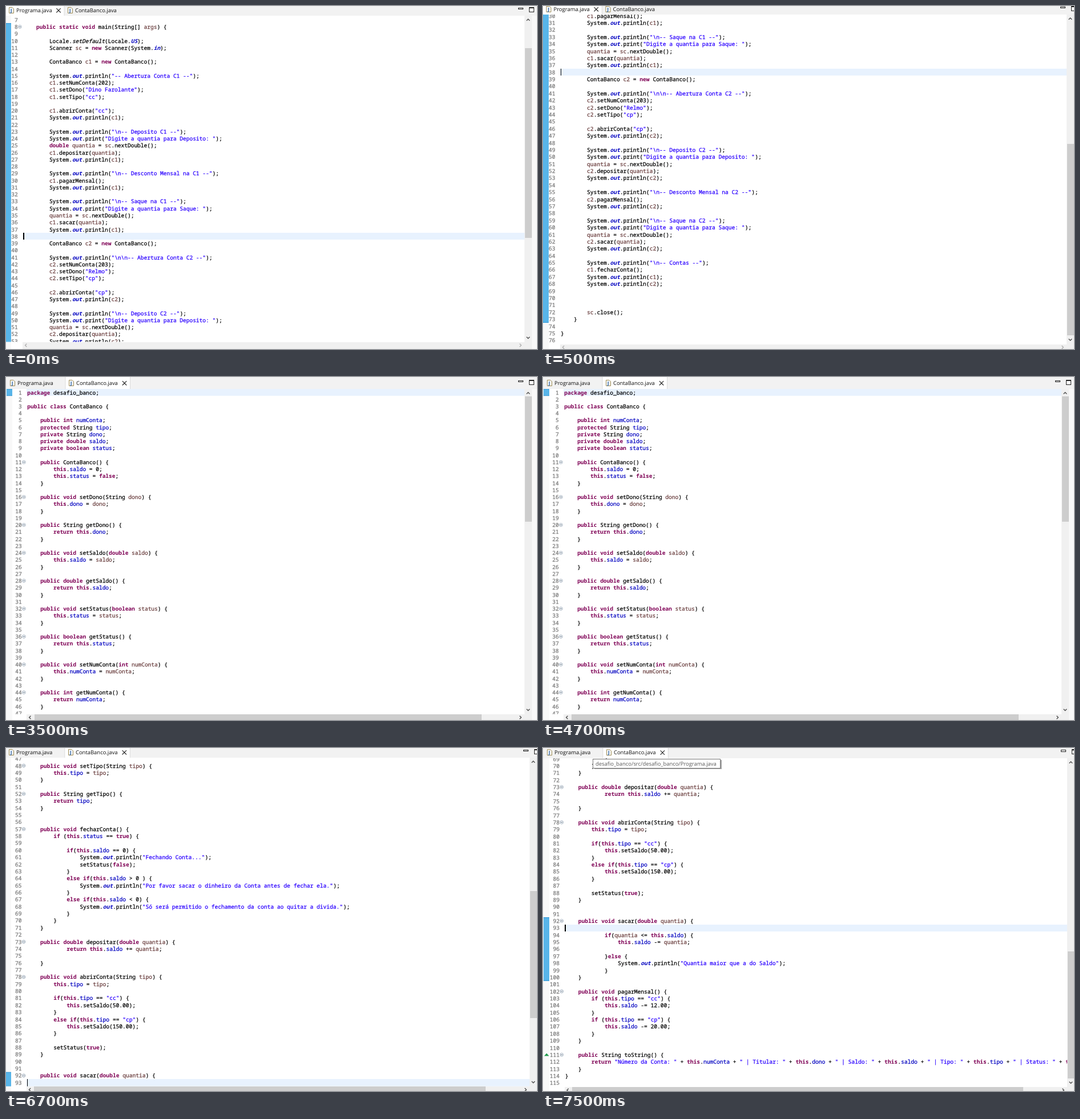
Recreate the animation shown at these times as an HTML page. Size 930x602 px, loop 8000 ms.

```html
<!DOCTYPE html>
<html lang="pt">
<head>
<meta charset="utf-8">
<title>Editor</title>
<style>
html, body { margin: 0; width: 100%; height: 100%; overflow: hidden; background: #fff; }
svg { display: block; position: absolute; left: 0; top: 0; }
text { white-space: pre; text-rendering: geometricPrecision; }
rect { shape-rendering: crispEdges; }
.code { font-family: "Noto Sans Mono", "DejaVu Sans Mono", monospace; color: #000; }
.code, .code tspan { fill: currentColor; stroke: currentColor; stroke-width: .25; }
.ui { font-family: "Open Sans", "Noto Sans", sans-serif; fill: #111; }
.num { color: #787878; text-anchor: end; }
.code .kw { color: #7f0055; font-weight: bold; stroke: none; }
.code .stat { color: #0000c0; font-weight: bold; font-style: italic; stroke: none; }
.str { color: #2a00ff; }
.ital { font-style: italic; }
.loc { color: #6a3e3e; }
.field { color: #0000c0; }
</style>
</head>
<body>
<svg id="stage" width="930" height="602" viewBox="0 0 930 602"></svg>
<script>
const programa = { first: 7, text: String.raw`
    public static void main(String[] args) {

        Locale.setDefault(Locale.US);
        Scanner sc = new Scanner(System.in);

        ContaBanco c1 = new ContaBanco();

        System.out.println("-- Abertura Conta C1 --");
        c1.setNumConta(202);
        c1.setDono("Dino Farolante");
        c1.setTipo("cc");

        c1.abrirConta("cc");
        System.out.println(c1);

        System.out.println("\n-- Deposito C1 --");
        System.out.print("Digite a quantia para Deposito: ");
        double quantia = sc.nextDouble();
        c1.depositar(quantia);
        System.out.println(c1);

        System.out.println("\n-- Desconto Mensal na C1 --");
        c1.pagarMensal();
        System.out.println(c1);

        System.out.println("\n-- Saque na C1 --");
        System.out.print("Digite a quantia para Saque: ");
        quantia = sc.nextDouble();
        c1.sacar(quantia);
        System.out.println(c1);

        ContaBanco c2 = new ContaBanco();

        System.out.println("\n\n-- Abertura Conta C2 --");
        c2.setNumConta(203);
        c2.setDono("Relmo");
        c2.setTipo("cp");

        c2.abrirConta("cp");
        System.out.println(c2);

        System.out.println("\n-- Deposito C2 --");
        System.out.print("Digite a quantia para Deposito: ");
        quantia = sc.nextDouble();
        c2.depositar(quantia);
        System.out.println(c2);

        System.out.println("\n-- Desconto Mensal na C2 --");
        c2.pagarMensal();
        System.out.println(c2);

        System.out.println("\n-- Saque na C2 --");
        System.out.print("Digite a quantia para Saque: ");
        quantia = sc.nextDouble();
        c2.sacar(quantia);
        System.out.println(c2);

        System.out.println("\n-- Contas --");
        c1.fecharConta();
        System.out.println(c1);
        System.out.println(c2);



        sc.close();
    }

}
` };

const conta = { first: 1, text: String.raw`package desafio_banco;

public class ContaBanco {

    public int numConta;
    protected String tipo;
    private String dono;
    private double saldo;
    private boolean status;

    public ContaBanco() {
        this.saldo = 0;
        this.status = false;
    }

    public void setDono(String dono) {
        this.dono = dono;
    }

    public String getDono() {
        return this.dono;
    }

    public void setSaldo(double saldo) {
        this.saldo = saldo;
    }

    public double getSaldo() {
        return this.saldo;
    }

    public void setStatus(boolean status) {
        this.status = status;
    }

    public boolean getStatus() {
        return this.status;
    }

    public void setNumConta(int numConta) {
        this.numConta = numConta;
    }

    public int getNumConta() {
        return numConta;
    }

    public void setTipo(String tipo) {
        this.tipo = tipo;
    }

    public String getTipo() {
        return tipo;
    }


    public void fecharConta() {
        if (this.status == true) {

            if(this.saldo == 0) {
                System.out.println("Fechando Conta...");
                setStatus(false);
            }
            else if(this.saldo > 0 ) {
                System.out.println("Por favor sacar o dinheiro da Conta antes de fechar ela.");
            }
            else if(this.saldo < 0) {
                System.out.println("Só será permitido o fechamento da conta ao quitar a divida.");
            }
        }
    }

    public double depositar(double quantia) {
            return this.saldo += quantia;

    }

    public void abrirConta(String tipo) {
        this.tipo = tipo;

        if(this.tipo == "cc") {
            this.setSaldo(50.00);
        }
        else if(this.tipo == "cp") {
            this.setSaldo(150.00);
        }

        setStatus(true);
    }


    public void sacar(double quantia) {

            if(quantia <= this.saldo) {
                this.saldo -= quantia;

            }else {
                System.out.println("Quantia maior que a do Saldo");
            }
    }

    public void pagarMensal() {
        if (this.tipo == "cc") {
            this.saldo -= 12.00;
        }
        if (this.tipo == "cp") {
            this.saldo -= 20.00;
        }
    }

    public String toString() {
        return "Número da Conta: " + this.numConta + " | Titular: " + this.dono + " | Saldo: " + this.saldo + " | Tipo: " + this.tipo + " | Status: " + this.status;
    }
}
` };

// line/y: a row and its centre; x: first code column; mark: lines of the range bar
const views = [
  { at: 0, file: programa, line: 10, y: 61, lh: 12.26, cw: 5.712, x: 30.2, top: 17, bottom: 589.5,
    tabY: 7, inset: 0, scale: 1, bar: 908, thumb: [74, 407], current: 38, caret: true, mark: [8, 60] },
  { at: 500, file: programa, line: 31, y: 29.5, lh: 12.385, cw: 5.765, x: 31, top: 15, bottom: 593,
    tabY: 5, inset: 0.5, scale: 1.0095, bar: 917, thumb: [242, 578], current: 38, caret: true, mark: [8, 73] },
  { at: 3500, file: conta, line: 1, y: 27, lh: 12.245, cw: 5.712, x: 37.3, top: 21, bottom: 591.5,
    tabY: 10, inset: 2, scale: 1, bar: 908, thumb: [34, 254], hthumb: [50, 833], current: 1, mark: [1, 1] },
  { at: 5500, file: conta, line: 48, y: 31, lh: 12.363, cw: 5.767, x: 37, top: 17, bottom: 593.7,
    tabY: 7, inset: 0, scale: 1.0095, bar: 917, thumb: [251, 474], hthumb: [49, 840], current: 93, caret: true, mark: [92, 100] },
  { at: 7500, file: conta, line: 70, y: 31.5, lh: 12.363, cw: 5.767, x: 38.7, top: 18, bottom: 594.5,
    tabY: 7.3, inset: 2, scale: 1.0095, bar: 918, thumb: [357, 580], hthumb: [51, 841], current: 93, caret: true, mark: [92, 100], tip: true }
];
const LOOP = 8000;

const rules = [
  ["str", /"[^"]*"/],
  ["kw", /\b(?:package|public|class|protected|private|static|void|int|double|boolean|new|return|this|if|else|true|false)\b/],
  ["stat", /(?<=\.)(?:out|in|US)\b/],
  ["ital", /\bsetDefault\b/],
  ["loc", /\b(?:args|sc|c1|c2|quantia)\b|(?<=\(\w+ |= )(?:numConta|tipo|dono|saldo|status)\b/],
  ["field", /\b(?:numConta|tipo|dono|saldo|status)\b/]
];
const lexer = new RegExp(rules.map(([, re]) => `(${re.source})`).join("|"), "g");

const esc = s => s.replace(/&/g, "&amp;").replace(/</g, "&lt;");
const rect = (x, y, w, h, fill, more = "") =>
  `<rect x="${x}" y="${y}" width="${w}" height="${h}" fill="${fill}" ${more}/>`;
const path = (d, stroke, width = 1, fill = "none") =>
  `<path d="${d}" stroke="${stroke}" stroke-width="${width}" fill="${fill}"/>`;
const label = (x, y, size, s, more = "") =>
  `<text class="ui" x="${x}" y="${y}" font-size="${size}" ${more}>${s}</text>`;

function codeLine(src, x, y, cw) {
  let out = "", col = 0;
  const put = (s, cls) => {
    if (s.trim()) {
      const lead = s.length - s.trimStart().length;
      out += `<tspan x="${x + (col + lead) * cw}" class="${cls}">${esc(s.trim())}</tspan>`;
    }
    col += s.length;
  };
  for (const m of src.matchAll(lexer)) {
    put(src.slice(col, m.index), "");
    put(m[0], rules[m.slice(1).findIndex(g => g !== undefined)][0]);
  }
  put(src.slice(col), "");
  return out && `<text class="code" y="${y}" font-size="${cw / 0.6}">${out}</text>`;
}

const fold = (x, y) =>
  `<circle cx="${x}" cy="${y}" r="2.8" fill="#fff" stroke="#8799ab" stroke-width=".8"/>` +
  path(`M${x - 1.6} ${y}h3.2`, "#50667c", .9);

const fileIcon = (x, y) =>
  path(`M${x + .5} ${y - 5}h5.5l2.5 2.5v7.5h-8z`, "#a08c50", 1, "#f4f7fc") +
  label(x + 2.8, y + 3, 8.5, "J", 'style="fill:#2a5f9e;font-weight:bold"');

const chevron = (x, y, dx, dy, color) => dy
  ? path(`M${x - 2.8} ${y + 1.4 * dy}L${x} ${y - 1.4 * dy}L${x + 2.8} ${y + 1.4 * dy}`, color, 1.4)
  : path(`M${x + 1.4 * dx} ${y - 2.8}L${x - 1.4 * dx} ${y}L${x + 1.4 * dx} ${y + 2.8}`, color, 1.4);

function editor(v, id) {
  const { x, lh, cw, top, bottom, bar } = v;
  const rowY = n => v.y + (n - v.line) * lh;
  const [from, to] = v.mark;
  const markTop = rowY(from) - lh / 2, markH = (to - from + 1) * lh;
  const left = v.inset > 1 ? 1 : 0, ruler = 9 + v.inset;
  let out = `<clipPath id="${id}"><rect y="${top}" width="${bar}" height="${bottom - top}"/></clipPath>` +
    rect(0, top, ruler, 602 - top, "#f8f8f8") + `<g clip-path="url(#${id})">` +
    rect(x - 1.2, rowY(v.current) - lh / 2, bar, lh, "#e8f2fe") +
    rect(left, markTop, ruler - left, markH, "#58b5e9") +
    path(`M${left} ${markTop + .4}H${ruler}M${left} ${markTop + markH - .4}H${ruler}`, "#2a8fd0", .8);
  v.file.text.split("\n").forEach((src, i) => {
    const n = v.file.first + i, y = rowY(n);
    if (y < top - lh || y > bottom + lh) return;
    out += `<text class="code num" x="${x - 9.6}" y="${y + 3.5}" font-size="${cw / 0.6}">${n}</text>` +
      codeLine(src, x, y + 3.5, cw);
    if (/^    public .*\{$/.test(src)) out += fold(x - 6, y);
    if (src.includes("toString")) out += path(`M2 ${y + 2}L6.3 ${y - 2.6}L10.6 ${y + 2}z`, "none", 0, "#1f9a4c");
  });
  if (v.caret) out += rect(x - .4, rowY(v.current) - lh / 2, 1.8, lh, "#000");
  return out + "</g>";
}

function scrollbars({ x, top, bottom, bar, thumb, hthumb }) {
  const mid = bar + 6.5, hy = bottom + 6, ink = hthumb ? "#505050" : "#b0b0b0";
  return rect(bar + 13, top, 20, 602, "#f8f8f8") +
    rect(bar, top, 13, 602 - top, "#f0f0f0") +
    rect(bar + .8, thumb[0], 12.2, thumb[1] - thumb[0], "#cdcdcd") +
    chevron(mid, top + 7.3, 0, 1, "#505050") + chevron(mid, bottom - 7.3, 0, -1, "#505050") +
    rect(x - 1.2, bottom + .5, bar - x + 1.2, 20, "#f0f0f0") +
    (hthumb ? rect(hthumb[0], bottom + .5, hthumb[1] - hthumb[0], 11, "#cdcdcd") : "") +
    chevron(x + 4.7, hy, 1, 0, ink) + chevron(bar - 7, hy, -1, 0, ink);
}

function tabs({ file, top, tabY, inset, scale, bar }) {
  const t1 = 18 + inset, t2 = t1 + 103 * scale, split = t1 + 84 * scale;
  const second = file === conta, size = 9.36 * scale;
  const cx = second ? t2 + 84.5 * scale : t1 + 74 * scale, end = cx + 10;
  return rect(0, 0, 930, top, "#f2f2f2") +
    (second ? rect(split, 0, end - split, top, "#fff") : rect(0, 0, split, top, "#fff")) +
    path(`M${split} 0V${top}` + (second ? `M${end} 0V${top}` : ""), "#dcdcdc") +
    fileIcon(t1 - 13, tabY + .5) + label(t1, tabY + 3.7, size, "Programa.java") +
    fileIcon(t2 - 13, tabY + .5) + label(t2, tabY + 3.7, size, "ContaBanco.java") +
    path(`M${cx - 3.7} ${tabY - 2.9}l7.4 7.4m0 -7.4l-7.4 7.4`, "#222", 1.1) +
    rect(bar - 10.5, tabY - 3.5, 8, 2.4, "#fff", 'stroke="#222"') +
    rect(bar + 8.5, tabY - 4.5, 8, 8, "#fff", 'stroke="#222"') +
    path(`M${bar + 8} ${tabY - 3.8}h9`, "#222", 1.6);
}

const tooltip = () =>
  rect(89.5, 21, 223, 16, "#000", 'opacity=".35"') +
  rect(87.5, 19.5, 222.5, 15.5, "#fff", 'stroke="#767676"') +
  label(92, 30.6, 9.4, "desafio_banco/src/desafio_banco/Programa.java", 'style="fill:#575757"');

const stage = document.getElementById("stage");
stage.innerHTML = views.map((v, i) =>
  `<g>${editor(v, "clip" + i)}${scrollbars(v)}${tabs(v)}${v.tip ? tooltip() : ""}</g>`).join("");
const layers = [...stage.children];

function draw(now) {
  const t = now % LOOP;
  const shown = views.findLastIndex(v => t >= v.at);
  layers.forEach((g, i) => { g.style.display = i === shown ? "" : "none"; });
}

const start = performance.now();
function tick(now) {
  draw(Math.max(0, now - start));
  requestAnimationFrame(tick);
}
draw(0);
requestAnimationFrame(tick);
</script>
</body>
</html>
```
